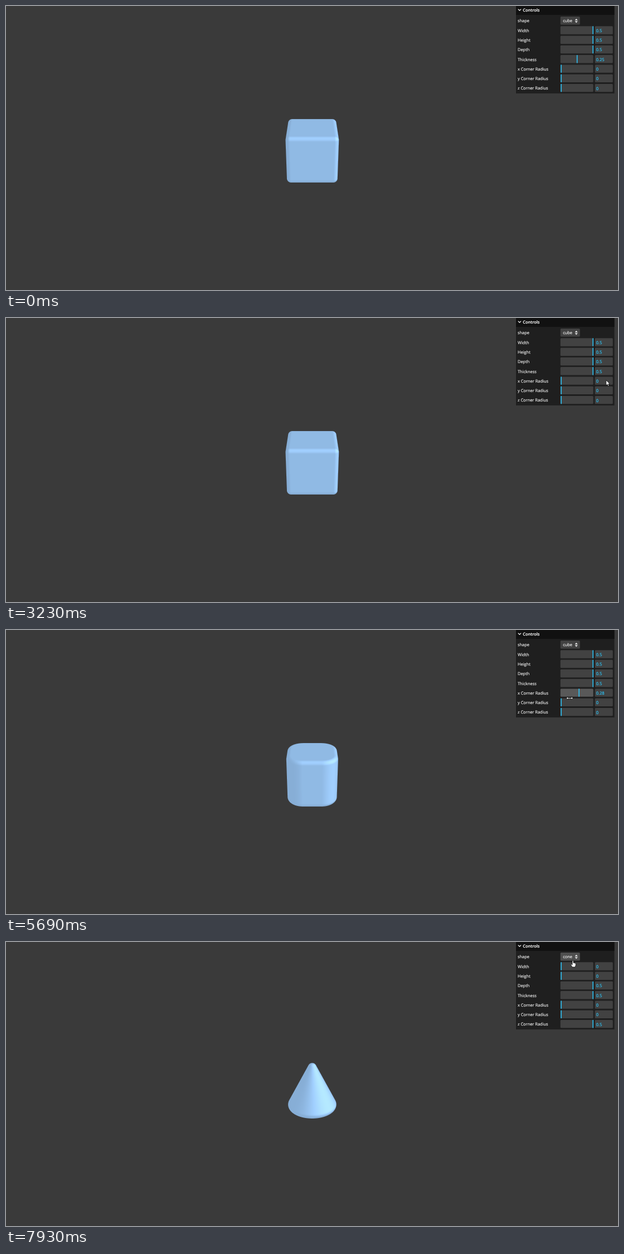
An HTML page with a canvas for the animation above (8 s loop, 1098 by 510 pixels).

```html
<!DOCTYPE html>
<html lang="en">
<head>
<meta charset="utf-8">
<title>Shape controls</title>
<style>
  html, body { margin: 0; width: 100%; height: 100%; overflow: hidden; background: #3a3a3a; }
  canvas, svg { position: absolute; display: block; }
  svg { left: 0; top: 0; }
  text {
    font: 7.45px "Open Sans", "Noto Sans", sans-serif;
    fill: #ebebeb; stroke: #ebebeb; stroke-width: .18;
    text-rendering: geometricPrecision;
  }
  .title { font-weight: 600; fill: #fff; }
  .value { fill: #2cc9ff; stroke: #2cc9ff; }
  .option { font: 9.4px "Liberation Sans", sans-serif; fill: #000; stroke: none; }
</style>
</head>
<body>
<canvas id="view" width="104" height="120" style="left:497px;top:200px"></canvas>
<svg id="ui" width="1098" height="510" viewBox="0 0 1098 510"></svg>
<script>
const LOOP = 8000, TICK = 77.2;
const ui = document.getElementById('ui');
const view = document.getElementById('view');
const ctx = view.getContext('2d');

function add(tag, attrs, parent = ui, label) {
  const el = document.createElementNS('http://www.w3.org/2000/svg', tag);
  for (const name in attrs) el.setAttribute(name, attrs[name]);
  if (label) el.textContent = label;
  parent.appendChild(el);
  return el;
}
const box = (x, y, width, height, fill, rx = 0, parent = ui) =>
  add('rect', { x, y, width, height, fill, rx }, parent);
const write = (x, y, label, cls = '', parent = ui) =>
  add('text', { x, y, class: cls }, parent, label);
const clamp = (v, lo, hi) => Math.min(hi, Math.max(lo, v));

// ---- control panel ----
const rowY = i => 26.2 + 17.28 * i;
const SLIDER_X = 994.7, SLIDER_W = 59, MARK_X = 995.3, MARK_RUN = 57.2;
const widget = (x, i, width) => box(x, rowY(i) - 7.2, width, 14.4, '#424242', 1.5);

box(915, 0, 176.5, 157, '#1f1f1f');
box(915, 0, 176.5, 16, '#111');
add('path', { d: 'M918.8 5.6L921.4 8.2 924 5.6', fill: 'none', stroke: '#fff', 'stroke-width': 1.3 });
write(927.3, 9.8, 'Controls', 'title');

write(918, rowY(0) + 3.2, 'shape');
const select = widget(SLIDER_X, 0, 35);
const shapeName = write(999.2, rowY(0) + 3.2, 'cube');
add('path', { d: 'M1020.6 25.7L1023.2 22.7 1025.8 25.7ZM1020.6 27.3L1023.2 30.3 1025.8 27.3Z', fill: '#ebebeb' });

const rows = ['Width', 'Height', 'Depth', 'Thickness', 'x Corner Radius', 'y Corner Radius', 'z Corner Radius']
  .map((label, i) => {
    const y = rowY(i + 1);
    write(918, y + 3.2, label);
    const slider = widget(SLIDER_X, i + 1, SLIDER_W);
    const mark = box(0, y - 7.2, 1.5, 14.4, '#2cc9ff');
    widget(1056.5, i + 1, 32.2);
    return { y, slider, mark, value: write(1058.8, y + 3.4, '0', 'value') };
  });

// ---- option list ----
const list = add('g', {});
box(995, 34, 93, 65, '#fff', 0, list);
const options = ['cube', 'cone', 'cylinder', 'tube', 'sphere'].map((label, i) => ({
  back: box(995, 34.5 + 12.8 * i, 93, 12.8, '#fff', 0, list),
  text: write(998, 44.2 + 12.8 * i, label, 'option', list)
}));

// ---- pointers, drawn around their hot spot ----
const pointers = {};
for (const [name, d] of Object.entries({
  arrow: 'M0 0V9.2L2.2 7.3 3.7 10.6 5.3 9.9 3.9 6.7H6.7Z',
  resize: 'M-6 0L-3-2.6V-.8H3V-2.6L6 0 3 2.6V.8H-3V2.6Z',
  hand: 'M-1 1Q-1 0 0 0T1 1V4.2L4.2 5Q5.2 5.4 5.2 6.4V9L4 12H-1L-3.6 8Q-4 6.8-3 6.6L-1 8Z'
})) pointers[name] = add('path', { d, fill: '#fff', stroke: '#000', 'stroke-width': .7 });

// ---- motion: eased pointer moves as [first tick, last tick, x, y] ----
const moves = [
  [2, 11, 1027, 95],        // to the thickness slider
  [16, 19, 1010, 97],       // drag down, then up
  [19, 25, 990, 99],
  [29, 38.5, 1088.5, 98],
  [40, 45, 1055, 137],      // round to the x corner slider
  [45, 51, 1005, 115],
  [54, 64, 1096.7, 117.7],  // drag up, off the stage, and back
  [64, 66, 1112, 118],
  [66, 78, 976, 124],
  [78, 81, 990, 70],        // to the shape menu
  [81, 86, 1012, 26],
  [90, 95, 1018, 57],       // pick an entry
  [99, 103, 1017, 33]
];

function pointerAt(k) {
  let x = 1047, y = 446;
  for (const [from, to, toX, toY] of moves) {
    const u = clamp((k - from) / (to - from), 0, 1), e = u * u * (3 - 2 * u);
    x += (toX - x) * e;
    y += (toY - y) * e;
  }
  return { x, y };
}

// A dragged value follows the pointer one tick late.
const drags = [{ row: 3, from: 17, to: 40, rest: .25 }, { row: 4, from: 55, to: 78, rest: 0 }];
function dragged({ from, to, rest }, k) {
  if (k < from) return rest;
  return clamp((pointerAt(Math.min(k, to) - 1).x - MARK_X) / MARK_RUN, 0, 1) / 2;
}

// ---- solid: distance field of a rounded, hollow, tapered prism ----
const ROUND = .1;
function field([w, h, d, thick, rx, , rz]) {
  const ax = w - rx, az = h - rx, by = -2 * d, bb = rz * rz + by * by;
  return (x, y, z) => {
    const dx = Math.abs(x) - ax, dz = Math.abs(z) - az;
    const px = Math.max(dx, 0), pz = Math.max(dz, 0);
    let q = Math.sqrt(px * px + pz * pz) + Math.min(Math.max(dx, dz), 0) - rx;
    q = Math.abs(q + thick) - thick;
    const top = y - d, low = y + d;
    const u = clamp((q * rz + top * by) / bb, 0, 1);
    const sx = q - rz * u, sy = top - by * u;
    const h0 = Math.max(q - rz, 0), h1 = Math.max(q, 0);
    const m = Math.min(sx * sx + sy * sy, h0 * h0 + low * low, h1 * h1 + top * top);
    const outside = Math.max(2 * d * q + rz * top, Math.abs(y) - d) > 0;
    return (outside ? 1 : -1) * Math.sqrt(m) - ROUND;
  };
}

const DIST = 8.944, SIN = .4472, COS = .8944, FOCAL = 660;
const MID_X = 549.4 - 497, MID_Y = 258.6 - 200;
const PIXEL = DIST / FOCAL;
const TINT = [135, 174, 214];

// Brightness from a light at (1, 1, 1).
function shade(sd, { x, y, z }) {
  const e = .002;
  const nx = sd(x + e, y, z) - sd(x - e, y, z);
  const ny = sd(x, y + e, z) - sd(x, y - e, z);
  const nz = sd(x, y, z + e) - sd(x, y, z - e);
  const norm = Math.sqrt(3 * (nx * nx + ny * ny + nz * nz)) || 1;
  return 1 + .35 * Math.max((nx + ny + nz) / norm, 0) ** 3;
}

function drawSolid(params) {
  const sd = field(params);
  const { width, height } = view;
  const img = ctx.createImageData(width, height);
  for (let j = 0; j < height; j++) for (let i = 0; i < width; i++) {
    const a = (i + .5 - MID_X) / FOCAL, b = (MID_Y - j - .5) / FOCAL;
    const len = Math.sqrt(1 + a * a + b * b);
    const vx = a / len, vy = (b * COS - SIN) / len, vz = (-b * SIN - COS) / len;
    const at = t => ({ x: vx * t, y: DIST * SIN + vy * t, z: DIST * COS + vz * t });

    // March to a surface half a pixel inside; near misses give soft edges.
    let t = DIST - 1.2, near = 1, nearT = t;
    for (let n = 0; n < 80 && t < DIST + 1.3; n++) {
      const s = sd(vx * t, DIST * SIN + vy * t, DIST * COS + vz * t) + PIXEL / 2;
      if (s < near) { near = s; nearT = t; }
      if (s < .001) break;
      t += s;
    }
    const cover = near < .001 ? 1 : 1 - near / PIXEL;
    if (cover <= 0) continue;
    const gain = shade(sd, at(nearT));
    const o = (j * width + i) * 4;
    for (let c = 0; c < 3; c++) img.data[o + c] = Math.min(255, TINT[c] * gain);
    img.data[o + 3] = 255 * cover;
  }
  ctx.putImageData(img, 0, 0);
}

// ---- one picture ----
let lastTick = -1, lastSolid = '';
function draw(k) {
  const cone = k >= 100, open = k >= 89 && !cone;
  const [thick, corner] = drags.map(d => dragged(d, k));
  const values = (cone ? [0, 0, .5, .5, 0, 0, .5] : [.5, .5, .5, thick, corner, 0, 0])
    .map(v => Math.round(v * 100) / 100);
  const { x, y } = pointerAt(k);

  const drag = drags.find(d => k >= d.from && k <= d.to);
  const held = drag ? drag.row : -1;
  const over = open ? -1
    : rows.findIndex(r => x > SLIDER_X && x < SLIDER_X + SLIDER_W && Math.abs(y - r.y) < 7.2);
  const hover = k > 16 ? over : -1;
  const onSelect = x > SLIDER_X && x < 1030 && Math.abs(y - rowY(0)) < 7.5;

  rows.forEach((r, i) => {
    r.slider.setAttribute('fill', i === held ? '#595959' : !drag && i === hover ? '#4f4f4f' : '#424242');
    r.mark.setAttribute('x', MARK_X + values[i] * 2 * MARK_RUN);
    r.value.textContent = values[i];
  });
  select.setAttribute('fill', onSelect ? '#4f4f4f' : '#424242');
  shapeName.textContent = cone ? 'cone' : 'cube';

  list.style.display = open ? '' : 'none';
  const picked = y > 47 ? 1 : 0;
  options.forEach((o, i) => {
    o.back.setAttribute('fill', i === picked ? '#1967d2' : '#fff');
    o.text.style.fill = i === picked ? '#fff' : '#000';
  });

  const kind = drag || over >= 0 ? 'resize' : onSelect ? 'hand' : 'arrow';
  for (const name in pointers) {
    pointers[name].style.display = name === kind && k > 0 ? '' : 'none';
    pointers[name].setAttribute('transform', `translate(${x} ${y})`);
  }

  const key = values.join();
  if (key !== lastSolid) {
    drawSolid(values);
    lastSolid = key;
  }
}

const start = performance.now();
function loop() {
  const t = (performance.now() - start) % LOOP;
  const k = Math.min(103, Math.floor((t + 24) / TICK));
  if (k !== lastTick) {
    draw(k);
    lastTick = k;
  }
  requestAnimationFrame(loop);
}
loop();
</script>
</body>
</html>
```
